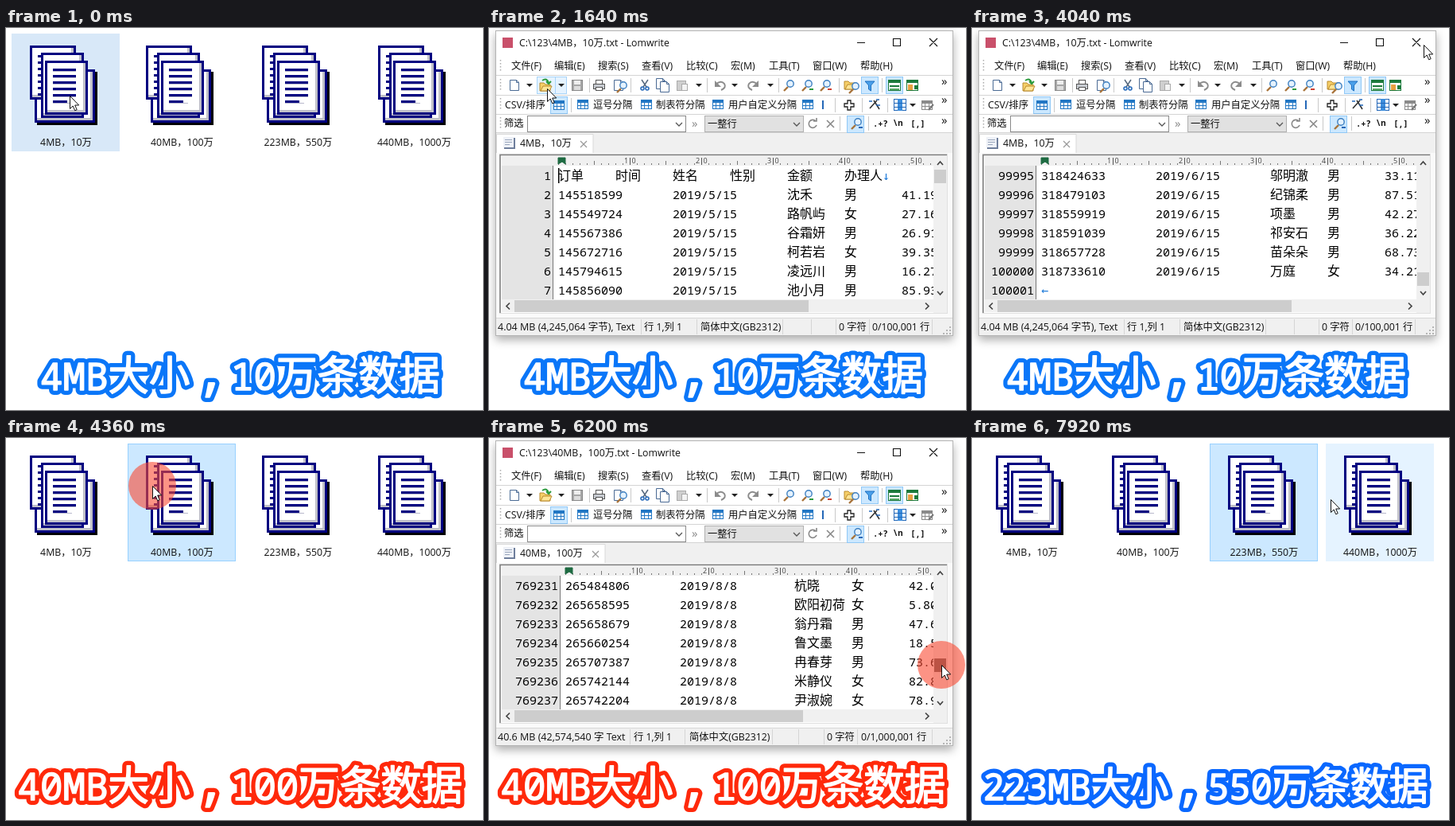
Recreate the animation shown at these times as an HTML page. Size 600 by 480 pixels, loop 8 s.

```html
<!DOCTYPE html>
<html lang="zh-CN">
<head>
<meta charset="utf-8">
<title>大文件打开演示</title>
<style>
html, body { margin: 0; width: 100%; height: 100%; overflow: hidden; background: #fff; }
svg { display: block; width: 600px; height: 480px; }
text { font: 12.3px 'Open Sans', 'Noto Sans CJK SC', sans-serif; fill: #111; white-space: pre; }
.mid { text-anchor: middle; }
.end { text-anchor: end; }
.mono { font: 15px 'Noto Sans Mono', monospace; fill: #000; }
.han { font: 16px 'Noto Sans CJK SC', sans-serif; fill: #000; }
.tiny { font-size: 9px; fill: #444; }
.code { font: 700 10.5px 'Noto Sans Mono', monospace; }
.blue { font: 15px 'DejaVu Sans Mono', monospace; fill: #1a78d8; }
.cap { font-family: 'Noto Sans CJK SC', sans-serif; font-weight: 400; fill: #fff; stroke: #fff; stroke-width: 1.6; stroke-linejoin: round; }
.cap.lat { font-family: 'Noto Sans Mono', monospace; }
.cap.edge { stroke-width: 12; }
.frame { filter: drop-shadow(0 5px 6px rgba(0, 0, 0, .32)); }
</style>
</head>
<body>
<svg id="stage" viewBox="0 0 600 480"></svg>
<script>
const LOOP = 8000;
const FILES = ['4MB，10万', '40MB，100万', '223MB，550万', '440MB，1000万'];

const CAPTIONS = [
  { x: 43, size: 51.5, color: '#0a76f8', mb: '4MB', count: '10' },
  { x: 14.5, size: 51.5, color: '#ff290b', mb: '40MB', count: '100' },
  { x: 14, size: 49, color: '#0a68ff', mb: '223MB', count: '550' }
];

const HEAD = '订单 时间 姓名 性别 金额 办理人';
const TOP = [HEAD,
  '145518599 2019/5/15 沈禾 男 41.19', '145549724 2019/5/15 路帆屿 女 27.16',
  '145567386 2019/5/15 谷霜妍 男 26.91', '145672716 2019/5/15 柯若岩 女 39.35',
  '145794615 2019/5/15 凌远川 男 16.27', '145856090 2019/5/15 池小月 男 85.93'];

// Each document: first line number and rows at the three scroll positions
const DOCS = [
  { shift: 0, tab: 131, thumbEnd: 402,
    size: '4.04 MB (4,245,064 字节), Text', total: '0/100,001 行',
    cols: [195, 266, 440, 482], seps: [191, 261, 369, 405, 436, 478, 557],
    first: [1, 58140, 99995],
    rows: [TOP, [
      '231604518 2019/5/30 杭晓 女 52.40', '231658027 2019/5/30 庄福隆 男 18.75',
      '231719346 2019/5/30 翁丹霜 女 63.08', '231780265 2019/5/30 鲁文墨 男 29.91',
      '231846190 2019/5/30 冉春芽 女 74.36', '231905733 2019/5/30 米静仪 女 35.62',
      '231967482 2019/5/30 辛妙闲 男 48.17'], [
      '318424633 2019/6/15 邬明澈 男 33.11', '318479103 2019/6/15 纪锦柔 男 87.51',
      '318559919 2019/6/15 项墨 男 42.27', '318591039 2019/6/15 祁安石 男 36.22',
      '318657728 2019/6/15 苗朵朵 男 68.73', '318733610 2019/6/15 万庭 女 34.21', '']] },
  { shift: 9, tab: 146, thumbEnd: 395,
    size: '40.6 MB (42,574,540 字 Text', total: '0/1,000,001 行',
    cols: [182, 252, 425, 468], seps: [177, 246, 356, 389, 421, 463, 557],
    first: [1, 769231, 999995],
    rows: [TOP, [
      '265484806 2019/8/8 杭晓 女 42.07', '265658595 2019/8/8 欧阳初荷 女 5.80',
      '265658679 2019/8/8 翁丹霜 男 47.63', '265660254 2019/8/8 鲁文墨 男 18.52',
      '265707387 2019/8/8 冉春芽 男 73.61', '265742144 2019/8/8 米静仪 女 82.84',
      '265742204 2019/8/8 尹淑婉 女 78.95'], [
      '345239604 2019/10/20 洛海鸥 男 96.04', '345240532 2019/10/20 庄福隆 女 44.21',
      '345278244 2019/10/20 辛妙闲 男 69.63', '345283345 2019/10/20 竺念柏 女 5.56',
      HEAD, TOP[1], '']] }
];

// Timeline: each entry changes part of the state and holds until the next
const STEPS = [
  [0, { view: 'files', doc: 0, pos: 0, thumb: 178, cap: 0, x: 80, y: 85, hot: 0, sel: -1, press: 0, ring: 0, open: 0 }],
  [120, { x: 73, y: 76 }],
  [640, { press: 1, sel: 0 }],
  [760, { press: 0 }],
  [960, { ring: 1 }],
  [1400, { view: 'opening', ring: 0 }],
  [1640, { view: 'full', open: 1 }],
  [1960, { x: 260, y: 140, open: 0 }],
  [2040, { x: 471, y: 209 }],
  [2280, { x: 540, y: 195 }],
  [2400, { x: 576, y: 187 }],
  [2600, { x: 570, y: 183 }],
  [2720, { x: 568, y: 181 }],
  [2960, { x: 566, y: 260, press: 1, pos: 1, thumb: 253 }],
  [3040, { x: 564, y: 334, pos: 2, thumb: 307 }],
  [3280, { x: 562, y: 352 }],
  [3360, { x: 558, press: 0 }],
  [3720, { x: 559, y: 343 }],
  [3920, { x: 543, y: 180 }],
  [4040, { x: 568, y: 21 }],
  [4240, { view: 'files', cap: 1, x: 184, y: 60, hot: 1, sel: -1 }],
  [4360, { press: 1, sel: 1 }],
  [4560, { press: 0 }],
  [4880, { ring: 1 }],
  [5000, { ring: 2 }],
  [5200, { view: 'opening', doc: 1, pos: 0, thumb: 178, x: 439, y: 196, ring: 0 }],
  [5320, { view: 'blank' }],
  [5560, { view: 'full' }],
  [5880, { x: 568, y: 185, press: 1 }],
  [5960, { y: 200 }],
  [6200, { x: 569, y: 285, pos: 1, thumb: 277 }],
  [6320, { y: 343, pos: 2, thumb: 307 }],
  [6520, { x: 570, y: 372 }],
  [6840, { x: 560, y: 250, press: 0 }],
  [6960, { x: 548, y: 107 }],
  [7160, { x: 528, y: 70 }],
  [7280, { x: 555, y: 38 }],
  [7480, { view: 'files', cap: 2, x: 310, y: 62, hot: -1, sel: 2 }],
  [7920, { x: 451, y: 77, hot: 3 }]
];

const rect = (x, y, w, h, fill, more = '') =>
  `<rect x="${x}" y="${y}" width="${w}" height="${h}" fill="${fill}" ${more}/>`;
const box = (x, y, w, h, fill, line) => rect(x + .5, y + .5, w - 1, h - 1, fill, `stroke="${line}"`);
const path = (d, line, width = 1, fill = 'none') =>
  `<path d="${d}" fill="${fill}" stroke="${line}" stroke-width="${width}"/>`;
const text = (x, y, s, cls = '', more = '') => `<text x="${x}" y="${y}" class="${cls}" ${more}>${s}</text>`;
const at = (x, y, s) => `<g transform="translate(${x} ${y})">${s}</g>`;
const each = (list, fn) => list.map(fn).join('');
const range = n => [...Array(n).keys()];

// File icon: overlapping sheets, only the rearmost casts a shadow
function sheet(x, y, w, h, ticks) {
  return rect(x, y, w, h, '#000080') +
    rect(x + 3, y + 3, w - 6, h - 6, '#c0c0c8') + rect(x + 3, y + 3, w - 9, h - 9, '#fff') +
    each(range(ticks), i => rect(x + 10, y + 12 + i * 8, 5, 3, '#000080'));
}
const ICON = rect(39, 55, 76, 67, '#000') + sheet(36, 52, 76, 67, 0) +
  sheet(30, 22, 58, 68, 7) + sheet(44, 31, 54, 82, 5) + sheet(49, 41, 54, 68, 0) +
  each(range(6), i => rect(59, 51 + i * 8, i > 4 ? 18 : 29, 3, '#000080') +
    rect(59, 54 + i * 8, i > 4 ? 24 : 29, 1, '#b8b8cc'));

function files(s) {
  return each(FILES, (name, i) => {
    let back = '';
    if (i === s.sel) {
      back = s.view === 'files' ? box(0, 0, 136, 148, '#cce8ff', '#99d1ff') : rect(0, 0, 136, 148, '#d9d9d9');
    } else if (i === s.hot) {
      back = rect(0, 0, 136, 148, i === 0 ? '#d8e8f8' : '#e5f3ff');
    }
    return at(146 * i, 0, at(7, 7, back) + ICON + text(75.5, 147.5, name, 'mid'));
  });
}

// Toolbar pieces
const drop = (x, y) => `<path d="M${x - 4} ${y - 2}h8l-4 4z" fill="#222"/>`;
const chevron = (x, y, line = '#555') => path(`M${x - 4} ${y - 2}l4 4 4-4`, line, 1.3);
const sep = (x, y) => rect(x, y, 1, 18, '#c9c9c9');
const lit = (x, y) => box(x, y, 22, 22, '#cce8ff', '#90c8f6');
const more = y => text(569, y, '»', '', 'style="font-size:15px"');
const lens = (x, y, mark) => path(`M${x - 1} ${y + 2}l-5 5`, '#a8733a', 2.4) +
  `<circle cx="${x + 2}" cy="${y - 2}" r="4.2" fill="#e4f2ff" stroke="#3d7fc0" stroke-width="1.4"/>` +
  (mark ? path(`M${x + 3} ${y + 5}h5`, mark, 2) : '');
const grid = (x, y, c = '#2277c4') => box(x - 7, y - 6, 14, 12, '#fff', c) + rect(x - 7, y - 6, 14, 4, c) +
  path(`M${x - 2.5} ${y - 6}v12M${x + 2.5} ${y - 6}v12M${x - 7} ${y + 1.5}h14`, c);
const page = (x, y) => path(`M${x - 5.5} ${y - 6.5}h8l3 3v10h-11z`, '#4a6a94', 1, '#fff') +
  path(`M${x + 2.5} ${y - 6.5}v3h3`, '#4a6a94');
const folder = (x, y) => path(`M${x - 7} ${y + 6}v-10h5l2 2h6v8z`, '#b98a2c', 1, '#f6cf68') +
  path(`M${x - 6} ${y + 6}l3-6h11l-3 6z`, '#b98a2c', 1, '#ffe596');
const turn = (x, y, d) =>
  path(`M${x - 6 * d} ${y - 1}q${7 * d}-6 ${11 * d} -1q${3 * d} 5 ${-4 * d} 8`, '#8c8c8c', 2) +
  `<path d="M${x - 7 * d} ${y - 6}v8h${8 * d}z" fill="#8c8c8c"/>`;

function toolbars(s) {
  const row1 = (s.open ? box(60, 61, 24, 22, '#e5f3ff', '#a8d4f8') + box(83, 61, 15, 22, '#e5f3ff', '#a8d4f8') : '') +
    page(32, 72) + drop(51, 72) + folder(71, 73) + path('M67 66q6-4 8 3m-3-2l3 3 3-3', '#2a9a3c', 2) + drop(91, 72) +
    box(104, 65, 14, 14, '#a8a8a8', '#888') + rect(107, 66, 8, 5, '#eee') + rect(107, 73, 8, 5, '#ddd') + sep(126, 63) +
    box(131, 70, 15, 7, '#c8ccd2', '#555') + box(134, 65, 9, 6, '#fff', '#555') + box(134, 74, 9, 5, '#fff', '#555') +
    page(163, 72) + lens(167, 74) + sep(178, 63) +
    path('M192 65l6 9M200 65l-6 9', '#56687e', 1.5) + path('M191 76a2 2 0 104 0 2 2 0 10-4 0M197 76a2 2 0 104 0 2 2 0 10-4 0', '#2468b8', 1.5) +
    page(216, 70) + page(221, 74) +
    box(236, 66, 12, 13, '#cfcfcf', '#aaa') + box(242, 70, 8, 9, '#f4f4f4', '#aaa') + drop(264, 72) + sep(274, 63) +
    turn(291, 72, 1) + drop(309, 72) + turn(332, 72, -1) + drop(354, 72) + sep(364, 63) +
    lens(377, 72) + lens(400, 72, '#2a9a3c') + lens(423, 72, '#d04030') + sep(440, 63) +
    folder(454, 71) + lens(459, 75) + lit(468, 61) + path('M473 67h12l-4.5 5v7l-3-2v-5z', '#1c6fc0', 1, '#4aa0ea') + sep(494, 63) +
    lit(499, 61) + box(502, 65, 16, 14, '#fff', '#1c7a3c') + rect(502, 65, 16, 4, '#1c7a3c') + rect(504, 72, 12, 2, '#1c7a3c') + rect(504, 76, 12, 2, '#58a868') +
    box(525, 65, 15, 14, '#fff', '#1c7a3c') + rect(525, 65, 15, 4, '#1c7a3c') + rect(527, 71, 6, 7, '#e8a040') + rect(535, 72, 4, 5, '#1c7a3c') + more(72);
  const row2 = text(20, 101, 'CSV/排序') + lit(77, 86) + grid(88, 97) + sep(103, 88) +
    grid(118, 96) + text(131, 101, '逗号分隔') + grid(198, 96) + text(210, 101, '制表符分隔') +
    grid(288, 96) + text(301, 101, '用户自定义分隔') + grid(401, 96) + rect(419, 91, 2, 11, '#2468b8') + sep(435, 88) +
    path('M451 91h4v4h4v4h-4v4h-4v-4h-4v-4h4z', '#222', 1.3) + sep(469, 88) +
    path('M479 101l9-10M484 91l7 11', '#333', 1.6) + path('M478 92h4M487 90h4M487 97h5', '#2468b8', 1.4) + sep(501, 88) +
    box(509, 89, 16, 15, '#fff', '#2468b8') + rect(514, 89, 6, 15, '#3b8ddd') + path('M509 94.5h16M509 99.5h16', '#2468b8') +
    drop(533, 97) + grid(551, 97, '#8a8a8a') + path('M553 103l6-7', '#777', 2) + more(95);
  const row3 = text(19, 124, '筛选') + box(48, 110, 200, 21, '#fff', '#8a8a8a') + chevron(239, 121) + text(255, 125, '»', '', 'style="font-size:15px;fill:#888"') +
    box(271, 110, 125, 21, '#e1e1e1', '#b0b0b0') + text(275, 125, '一整行') + chevron(387, 121) +
    path('M411 117a5 5 0 10 1 5M412 113v4h-4', '#888', 1.6) + path('M425 116l9 9M434 116l-9 9', '#888', 1.6) + sep(441, 111) +
    lit(450, 110) + lens(462, 120, '#2468b8') + sep(477, 111) +
    text(483, 124, '.+?', 'code') + text(508, 123, '\\n', 'code') + text(530, 124, '[,]', 'code') + more(121);
  return rect(9, 37, 574, 95, '#fff') + each([59, 84, 108, 131], y => rect(9, y, 574, 1, '#d4d4d4')) +
    each([['文件(F)', 28], ['编辑(E)', 82], ['搜索(S)', 137], ['查看(V)', 192], ['比较(C)', 248],
      ['宏(M)', 304], ['工具(T)', 352], ['窗口(W)', 407], ['帮助(H)', 467]], ([m, x]) => text(x, 52, m)) +
    each([48, 72, 96, 120], y => `<path d="M14.5 ${y - 8}v16" stroke="#aaa" stroke-width="1.5" stroke-dasharray="1.5 2.5"/>`) +
    row1 + row2 + row3;
}

function line(row, i, d, first) {
  const x = 87 + d.shift, y = 190.5 + i * 24;
  const num = text(x - 9, y, first + i, 'mono end');
  if (!row) return num + text(x, y, '←', 'blue');
  const cells = row.split(' ');
  const col = cells.length > 5 ? [0, 72, 144, 216, 288, 360] : [0, 144, 288, 360, 432];
  return num + each(cells, (c, k) => text(x + col[k], y, c, /^[\d./]+$/.test(c) ? 'mono' : 'han')) +
    (cells.length > 5 ? text(x + 408, y, '↓', 'blue') : '');
}

function editor(s, d) {
  const x = 87 + d.shift;
  const ruler = rect(16, 161, 544, 12, '#f0f0f0') +
    each(range(53), i => rect(x + i * 9, i % 5 ? 170 : 167, 1, i % 5 ? 2 : 5, '#777')) +
    each([1, 2, 3, 4, 5], n => rect(x + n * 90, 163, 1, 9, '#555') +
      text(x + n * 90 - 7, 170, n, 'tiny') + text(x + n * 90 + 2.5, 170, 0, 'tiny')) +
    path(`M${x} 163h9v8l-4-3-5 3z`, '#1e6b42', 1, '#1e6b42');
  const caret = s.pos ? '' : rect(x, 176, 1.5, 19, '#000');
  return `<g clip-path="url(#pane)">${rect(16, 161, 65 + d.shift, 180, '#e4e4e4')}${ruler}` +
    rect(x - 7, 173, 1, 168, '#777') + each(d.rows[s.pos], (r, i) => line(r, i, d, d.first[s.pos])) + caret + '</g>' +
    rect(559, 161, 17, 197, '#f0f0f0') + rect(16, 341, 560, 16, '#f0f0f0') +
    path('M564 172l3.5-4 3.5 4M564 331l3.5 4 3.5-4M26 345.5l-4 4 4 4M549 345.5l4 4-4 4', '#444', 1.7) +
    rect(560, s.thumb, 15, 17, s.press ? '#606060' : '#cdcdcd') + rect(32, 342, d.thumbEnd - 32, 15, '#cdcdcd');
}

function status(d) {
  const [a, b, c, e] = d.cols;
  return each(d.seps, x => rect(x, 366, 1, 19, '#d5d5d5')) +
    text(11, 380, d.size, '', 'style="font-size:12.5px"') + text(a, 380, '行 1,列 1') +
    text(b, 380, '简体中文(GB2312)') + text(c, 380, '0 字符') + text(e, 380, d.total) +
    each([[579, 375], [575, 379], [579, 379], [571, 383], [575, 383], [579, 383]], ([x, y]) => rect(x, y, 2, 2, '#b5b5b5'));
}

function win(s) {
  const d = DOCS[s.doc], name = FILES[s.doc], full = s.view === 'full';
  const base = `<g class="frame">${rect(8.5, 3.5, 575, 383, '#fff', 'stroke="#b4b4b4"')}</g>` +
    rect(9, 34, 574, 352, '#f0f0f0') + each([59, 83, 108], y => rect(9, y, 574, 1, '#b8b8b8')) +
    rect(17, 12, 13, 13, '#c9506a') +
    path('M463 18.5h10M508.5 13.5h9v9h-9zM554 13l10 10M564 13l-10 10', '#111', 1.1) +
    path(`M9.5 157.5V133.5H${d.tab}V157.5`, '#d8d8d8', 1, '#fff') +
    rect(19, 138, 14, 14, '#6f7f9c') + rect(18, 137, 13, 13, '#eef1f7') +
    path('M20 140.5h9M20 143.5h9M20 146.5h6', '#9aa6bc') + text(39, 149, name) +
    path(`M${d.tab - 16} 142l8 8m0-8l-8 8`, '#999', 1.2) +
    rect(9, 157, 574, 207, '#fafafa') + box(13, 158, 564, 201, '#fff', '#e0e0e0') +
    path('M14 358V159.5H576', '#808080', 1.6) + rect(9, 364, 574, 1, '#d8d8d8');
  const detail = full
    ? rect(9, 34, 574, 4, '#fff') + text(38, 23, `C:\\123\\${name}.txt - Lomwrite`) + toolbars(s) + editor(s, d) + status(d)
    : rect(559, 341, 17, 17, '#f0f0f0');
  const fade = s.view === 'opening'
    ? 'opacity=".65" transform="translate(295.5 195) scale(.982) translate(-295.5 -195)"' : '';
  return `<g ${fade}>${base}${detail}</g>`;
}

// Outlined caption: all edges first, then the white letters on top
function caption({ x, size, color, mb, count }) {
  const latin = s => ({ s, cls: 'lat', font: size * .922, width: s.length * size * .553 });
  const han = s => ({ s, cls: '', font: size, width: s.length * size });
  const comma = { s: ',', cls: 'lat', font: size * 1.3, width: size, inset: size * .11 };
  const parts = [latin(mb), han('大小'), comma, latin(count), han('万条数据')];
  const draw = (cls, paint) => {
    let pen = x;
    return each(parts, p => {
      const out = text(pen + (p.inset || 0), 454.5, p.s, `cap ${p.cls} ${cls}`, `style="font-size:${p.font}px;${paint}"`);
      pen += p.width;
      return out;
    });
  };
  return draw('edge', `fill:${color};stroke:${color}`) + draw('', '');
}

function pointer(s) {
  const ring = s.ring ? '<circle cx="15.5" cy="0" r="5" fill="none" stroke="#1a8ad8" stroke-width="3"/>' +
    path(s.ring > 1 ? 'M15.5 5a5 5 0 005-5' : 'M15.5-5a5 5 0 015 5', '#8fd4ff', 3) : '';
  return (s.press ? `<circle cx="${s.x}" cy="${s.y}" r="30" fill="#fa4c34" fill-opacity=".6"/>` : '') +
    at(s.x + .5, s.y + .5, path('M0 0V16L3.7 12.5L6.2 18.3L8.7 17.2L6.2 11.5H11.2Z', '#111', 1, '#fff') + ring);
}

const CLIP = `<clipPath id="pane">${rect(16, 161, 543, 180, '#000')}</clipPath>`;
function scene(s) {
  return CLIP + (s.view === 'files' || s.view === 'opening' ? files(s) : '') +
    (s.view === 'files' ? '' : win(s)) + caption(CAPTIONS[s.cap]) + pointer(s);
}

let merged = {};
const states = STEPS.map(([, change]) => (merged = { ...merged, ...change }));
const stage = document.getElementById('stage');
const start = performance.now();
let shown = -1;

function tick() {
  const t = (performance.now() - start) % LOOP;
  const now = STEPS.findLastIndex(([from]) => from <= t);
  if (now !== shown) stage.innerHTML = scene(states[shown = now]);
  requestAnimationFrame(tick);
}
tick();
</script>
</body>
</html>
```
